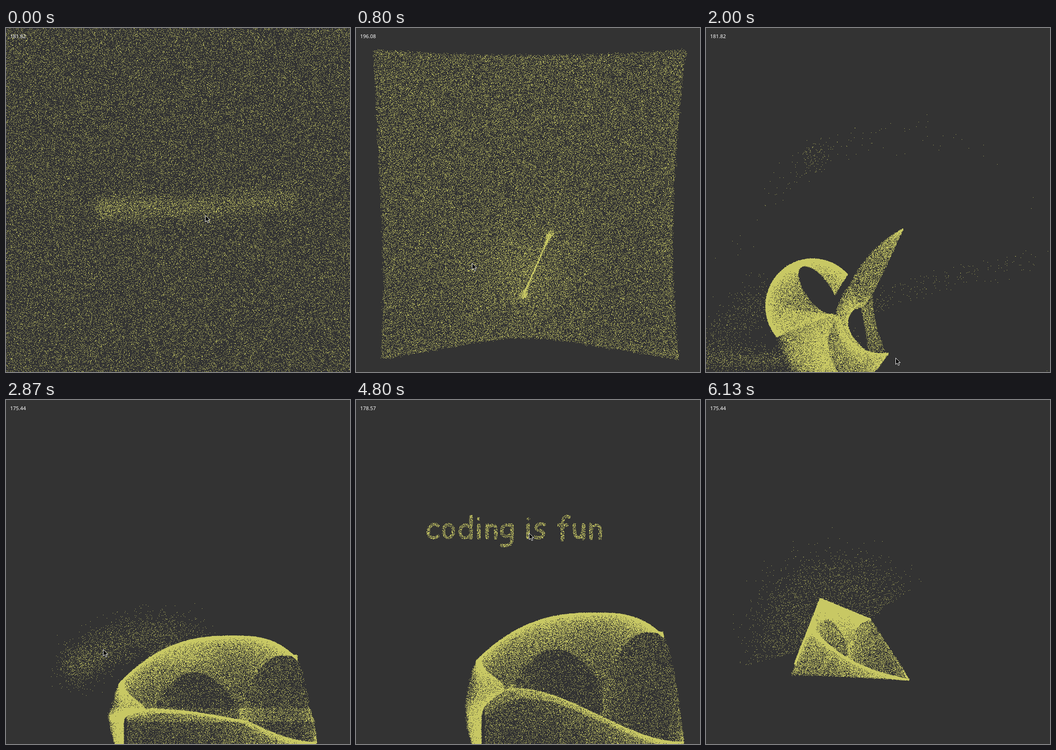
An HTML page with a canvas for the animation above (6190 ms loop, 748 by 748 pixels).

```html
<!DOCTYPE html>
<html lang="en">
<head>
<meta charset="utf-8">
<title>Particles</title>
<style>
html, body { margin: 0; width: 100%; height: 100%; overflow: hidden; background: #333; }
canvas { display: block; }
</style>
</head>
<body>
<canvas id="stage" width="748" height="748"></canvas>
<script>
const start = performance.now();
const SIZE = 748, LOOP = 6190, STEP = 200 / 3;
const COUNT = 96000, LETTERS = 3900;
const BACK = 0xff333333, DOT = 0xff64c8c8;
const ctx = document.getElementById('stage').getContext('2d');

let seed = 20117;
function rnd() {
  seed = (seed + 0x6d2b79f5) | 0;
  let n = Math.imul(seed ^ (seed >>> 15), 1 | seed);
  n = (n + Math.imul(n ^ (n >>> 7), 61 | n)) ^ n;
  return ((n ^ (n >>> 14)) >>> 0) / 4294967296;
}
const gauss = () => (rnd() + rnd() + rnd() + rnd() - 2) * 1.73;
const clamp = (v) => Math.max(0, Math.min(1, v));
const smooth = (s) => s * s * (3 - 2 * s);
const mix = (a, b, s) => a + (b - a) * s;
const blend = (p, q, s) => [mix(p[0], q[0], s), mix(p[1], q[1], s)];
const fuzz = ([x, y], sx, sy = sx) => [x + gauss() * sx, y + gauss() * sy];

// Point on an ellipse; angle and tilt in degrees
function orbit(cx, cy, rx, ry, angle, tilt = 0) {
  const a = angle * Math.PI / 180, t = tilt * Math.PI / 180;
  const x = rx * Math.cos(a), y = ry * Math.sin(a);
  return [cx + x * Math.cos(t) - y * Math.sin(t), cy + x * Math.sin(t) + y * Math.cos(t)];
}
// Curve through three points
function bow(a, b, c, u) {
  const at = (k) => a[k] * (1 - u) * (1 - 2 * u) + 4 * b[k] * u * (1 - u) + c[k] * u * (2 * u - 1);
  return [at(0), at(1)];
}

// Outlines of the dome
const rim = (x) => x < 520 ? 464 + 104 * ((520 - x) / 258) ** 2.5 : 464 + 51 * ((x - 520) / 148) ** 3;
const arch = (x) =>
  x < 335 ? 625 + 0.3 * (335 - x) :
  x < 536 ? 542 + 83 * ((x - 435) / 101) ** 2 :
  505 + 120 * ((632 - Math.min(x, 632)) / 96) ** 2;
const ceiling = (x) => x < 668 ? arch(x) : 515 + 230 * ((x - 668) / 45) ** 1.67;
const crease = (x) => x < 345 ? 627 + 23 * ((345 - x) / 65) ** 2 : 627 + 118 * smooth((x - 345) / 367);
const floor = (x) => 830 - 85 * clamp((x - 262) / 445);

function veil(from, to) {
  return (u, w) => {
    const x = mix(from, to, u);
    return [x, mix(ceiling(x), crease(x), w)];
  };
}

// Parts of the sheet: share of dots, crowding, place in the dome and in the twist
const patches = [
  { // left wall
    share: 0.2, power: 0.6,
    dome(u, w) {
      const y = mix(568, 790, u);
      const outer = 237 + 25 * ((y - 670) / 102) ** 2;
      const inner = 272 + 50 * Math.exp(-(((y - 625) / 30) ** 2));
      return [mix(outer, inner, w), y];
    },
    twist: (u, w) => blend(
      bow([131, 605], [148, 670], [195, 760], u),
      bow([290, 625], [265, 690], [300, 770], u), w)
  },
  { // shell
    share: 0.5, power: 3,
    dome(u, w) {
      const x = mix(262, 668, u);
      return [x, mix(rim(x), arch(x), w)];
    },
    twist: (u, w) => blend(
      orbit(232, 605, 101, 102, mix(140, 318, u)),
      orbit(243, 570, 62, 27, 300 * u, 54), w)
  },
  { // right veil
    share: 0.06, power: 1,
    dome: veil(536, 712),
    twist: (u, w) => blend(
      bow([428, 437], [340, 512], [292, 622], u),
      bow([428, 437], [384, 535], [345, 605], u), w)
  },
  { // left veil
    share: 0.02, power: 1,
    dome: veil(335, 536),
    twist: (u, w) => blend(
      bow([362, 580], [370, 645], [394, 712], u),
      bow([335, 600], [347, 660], [360, 748], u), w)
  },
  { // crease
    share: 0.06, power: 1.5,
    dome(u, w) {
      const x = mix(280, 712, u);
      return [x, crease(x) + w * (10 + 28 * (1 - u) ** 4)];
    },
    twist: (u, w) => blend(
      bow([335, 600], [308, 645], [345, 700], u),
      bow([310, 560], [284, 650], [340, 730], u), w)
  },
  { // skirt
    share: 0.16, power: 1.7,
    dome(u, w) {
      const x = mix(280, 712, u);
      return [x, mix(crease(x), floor(x), w)];
    },
    twist: (u, w) => blend(
      bow([290, 625], [325, 690], [396, 708], u),
      bow([165, 700], [260, 790], [375, 738], u), w)
  }
];

// The dome seen lower down, and drawn together into a tent
const sunk = ([x, y], s) => [x - s * (15 + (x - 237) * 0.046), y + s * 50 * clamp((700 - y) / 80)];
function tent([x, y]) {
  const u = clamp((x - 262) / 445) ** 1.5;
  const v = clamp((y - rim(x)) / (floor(x) - rim(x)));
  return blend(blend([249, 433], [373, 484], u), blend([184, 597], [440, 608], u), v);
}

// The flat sheet at rest, and the same sheet drawn inwards
const flat = (a, b) => [mix(-45, 780, a), mix(-45, 782, b)];
function pulled(a, b) {
  a += 0.008 * Math.sin(Math.PI * a ** 12);
  b += 0.006 * Math.sin(Math.PI * b ** 12);
  const sag = 1 - (2 * a - 1) ** 2;
  const x = mix(38 + 17 * Math.sin(b * 1.88), 718 - 90 * b + 75 * b * b, a);
  const y = mix(47 + 12 * sag, 722 - 29 * sag, b);
  const dx = 365 - x, dy = 535 - y;
  const k = 0.27 * Math.exp(-(dx * dx + dy * dy) / 32000);
  return fuzz([x + dx * k, y + dy * k], 1.5);
}
function band() {
  const x = 200 + 430 * rnd() ** 1.3;
  return fuzz([x, 390 - 22 * clamp((x - 440) / 190)], 6, 15);
}
function spine() {
  const s = (1 - Math.cos(Math.PI * rnd())) / 2;
  const p = bow([423, 446], [391, 520], [363, 584], s);
  return fuzz(p, 0.8 + 5 * Math.abs(2 * s - 1) ** 6);
}

// Loose dots around the sheet
function swirl() {
  const r = rnd();
  if (r < 0.4) return fuzz([mix(-60, 190, rnd()), 722], 5, 15);
  if (r < 0.58) {
    const s = rnd();
    return fuzz([mix(-20, 150, s), mix(715, 575, s)], 25);
  }
  if (r < 0.64) return orbit(430, 600, 375 + gauss() * 22, 375 + gauss() * 22, 238 + 26 * gauss() ** 3);
  if (r < 0.69) {
    const s = rnd() ** 1.6;
    return fuzz([370 + 350 * s, 612 - 107 * s ** 0.6], 13);
  }
  return fuzz([270, 710], 30, 20);
}
function cloud() {
  if (rnd() < 0.35) return fuzz([390, 555], 35, 12);
  const s = rnd() ** 1.5;
  return fuzz([145 + 250 * s, 582 - 75 * Math.sin(2 * s)], 20 + 20 * s, 24);
}
function burst() {
  if (rnd() < 0.35) return fuzz([280, 500], 35, 20);
  const r = 130 + gauss() * 38;
  return orbit(285, 525, r, r, mix(165, 325, rnd()));
}
// Letters settle from the middle out, the rest still drains up in lanes
function forming([x, y]) {
  if (rnd() < 0.06) return fuzz([360, 410], 70, 50);
  if (x > 280 && x < 413 && rnd() < 0.5) return fuzz([x, y], 1);
  const lane = x < 268 ? 247 : x < 345 ? 290 : x < 420 ? 380 : 455;
  const s = rnd();
  return fuzz([mix(lane, 345, s * s), mix(272, 435, s)], lane > 400 ? 26 : 9);
}

// Handwritten "coding is fun"
const strokes = [
  'M178 273C166 265 157 277 157 287C157 301 170 302 179 296',
  'M190 285a11 14 0 1 0 22 0a11 14 0 1 0 -22 0',
  'M249 277C236 266 226 276 226 287C226 302 242 302 249 294M250 253V300',
  'M267 272V300M267 258v.5',
  'M285 271V300M285 282C293 268 304 270 304 282V300',
  'M338 274C325 267 317 275 317 285C317 300 332 298 338 290M339 271V303C339 316 328 318 317 316',
  'M374 271V299M375 258v.5',
  'M409 271C398 267 390 273 392 279C394 285 408 283 408 291C408 301 396 301 389 298',
  'M463 254C452 250 450 260 449 270V304M441 272H459',
  'M475 271C474 290 476 299 484 299C492 299 494 288 494 272M495 271V302',
  'M511 270V301M511 283C515 271 531 266 531 284V301'
];
function inkPoints() {
  const c = document.createElement('canvas');
  c.width = c.height = SIZE;
  const g = c.getContext('2d');
  g.lineWidth = 7;
  g.lineCap = g.lineJoin = 'round';
  strokes.forEach(d => g.stroke(new Path2D(d)));
  const data = g.getImageData(0, 0, SIZE, SIZE).data, list = [];
  for (let i = 0; i < SIZE * SIZE; i++) {
    if (data[4 * i + 3] > 110) list.push([i % SIZE, Math.floor(i / SIZE)]);
  }
  return list;
}

function letterPath(ink) {
  const goal = ink[Math.floor(rnd() * ink.length)], a = rnd(), b = rnd();
  return [flat(a, b), pulled(a, b), swirl(), cloud(), forming(goal), goal, burst()];
}

function sheetPath(i) {
  const a = rnd(), u = rnd();
  let left = 0, k = 0;
  while (k < patches.length - 1 && a >= left + patches[k].share) left += patches[k++].share;
  const p = patches[k], w = clamp((a - left) / p.share) ** p.power;
  const dome = p.dome(u, w);
  return [
    i % 24 ? flat(a, u) : band(),
    i % 48 ? pulled(a, u) : spine(),
    p.twist(u, w), sunk(dome, 1), sunk(dome, 0.18), dome, tent(dome)
  ].map((q, n) => n < 2 ? q : fuzz(q, 0.8));
}

const times = [0, 800, 2000, 2870, 3930, 4800, 6130];
const eases = [
  s => s ** 2.8,
  s => s,
  s => 1 - (1 - s) ** 1.5,
  s => 1 - (1 - s) ** 2,
  s => 1 - (1 - s) ** 1.6,
  s => s * s
];
const keys = times.map(() => new Float32Array(COUNT * 2));
const ink = inkPoints();
for (let i = 0; i < COUNT; i++) {
  const path = i < LETTERS ? letterPath(ink) : sheetPath(i);
  path.forEach((p, k) => keys[k].set(p, 2 * i));
}

function segment(t) {
  let k = 0;
  while (k < times.length - 2 && t >= times[k + 1]) k++;
  return [k, clamp((t - times[k]) / (times[k + 1] - times[k]))];
}

const image = ctx.createImageData(SIZE, SIZE);
const pixels = new Uint32Array(image.data.buffer);
function drawDots(t) {
  const [k, s] = segment(t), e = eases[k](s), from = keys[k], to = keys[k + 1];
  pixels.fill(BACK);
  for (let i = 0; i < 2 * COUNT; i += 2) {
    const x = Math.floor(mix(from[i], to[i], e));
    const y = Math.floor(mix(from[i + 1], to[i + 1], e));
    if (x >= 0 && y >= 0 && x < SIZE && y < SIZE) pixels[y * SIZE + x] = DOT;
  }
  ctx.putImageData(image, 0, 0);
}

const pointer = [[433, 407], [252, 511], [412, 717], [211, 542], [376, 289], [376, 289]];
const arrow = new Path2D('M0 0V14L3.3 11L5.6 16.2L8 15.2L5.7 10.2H10Z');
function drawPointer(t) {
  if (t > 5350) return;
  const [k, s] = segment(t);
  const [x, y] = blend(pointer[k], pointer[k + 1] || pointer[k], smooth(s));
  ctx.save();
  ctx.translate(Math.round(x) + 0.5, Math.round(y) + 0.5);
  ctx.fillStyle = '#000';
  ctx.strokeStyle = '#fff';
  ctx.fill(arrow);
  ctx.stroke(arrow);
  ctx.restore();
}

// Frame rate readout: one early peak, then a slow sway
function drawRate(n) {
  const peak = 5 * Math.exp(-(((n - 12) / 8) ** 2));
  const ticks = Math.round(55.9 + 0.7 * Math.sin((n - 36) * 0.26) - peak);
  ctx.font = '11px "Noto Sans", "Open Sans", sans-serif';
  ctx.fillStyle = '#fff';
  ctx.fillText((10000 / ticks).toFixed(2), 9, 22);
}

let shown = -1;
function tick() {
  const t = (performance.now() - start) % LOOP;
  let n = Math.round(t / STEP);
  if (Math.round(n * STEP / 10) * 10 > t) n--;
  n = Math.min(n, 92);
  if (n !== shown) {
    shown = n;
    drawDots(n * STEP);
    drawRate(n);
    drawPointer(n * STEP);
  }
  requestAnimationFrame(tick);
}
tick();
</script>
</body>
</html>
```
